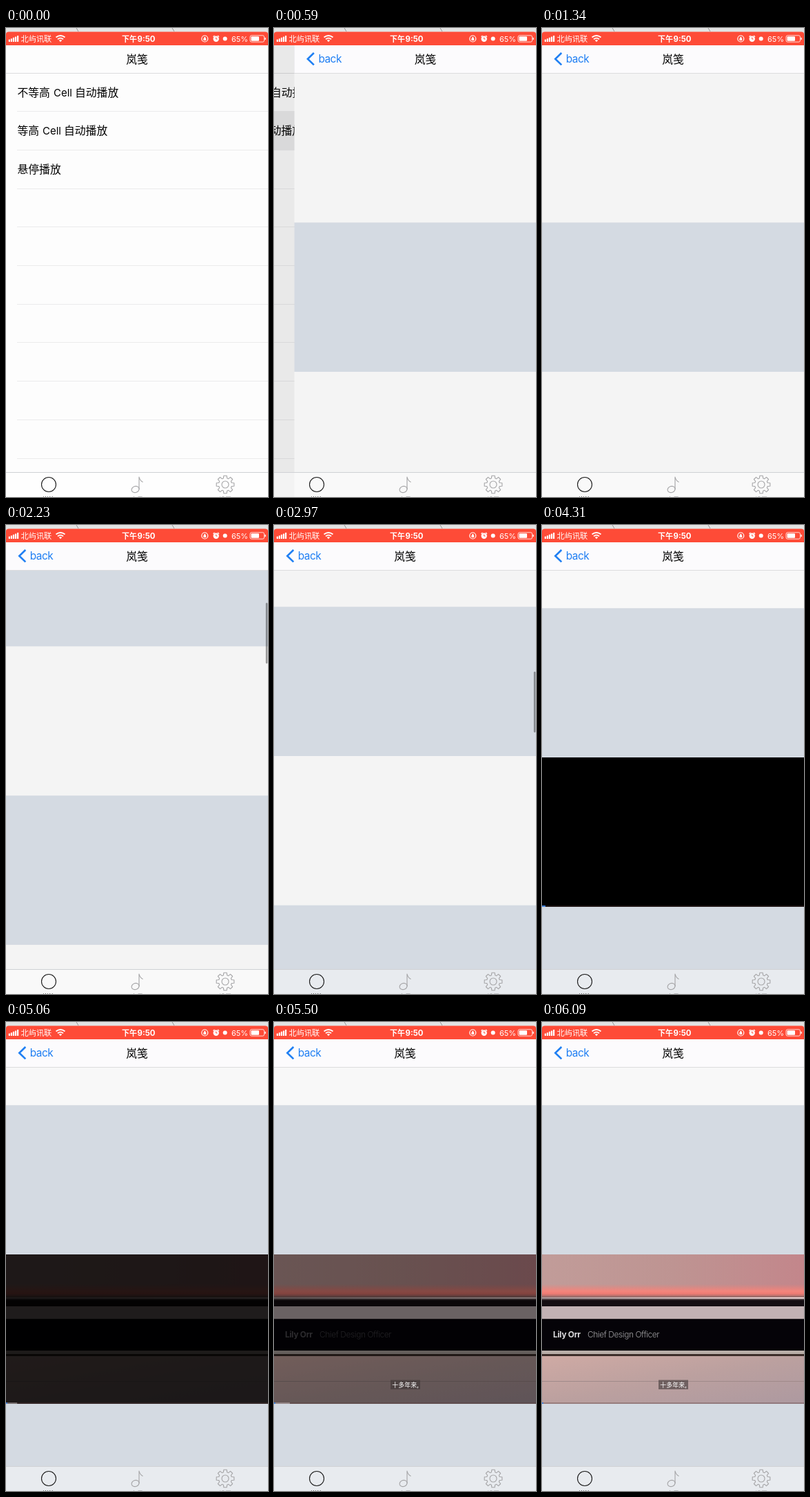
Animation, 380 px wide and 678 px high, one loop 6190 ms. Source, as an HTML page:

```html
<!DOCTYPE html>
<html lang="zh">
<head>
<meta charset="utf-8">
<title>自动播放</title>
<style>
  html, body { margin: 0; width: 100%; height: 100%; overflow: hidden; background: #fdfdfd; }
  svg { display: block; width: 380px; height: 678px; font-family: Inter, "Noto Sans CJK SC", "Noto Sans CJK", sans-serif; }
  text { white-space: pre; }
  .title { font-size: 15.8px; font-weight: 500; text-anchor: middle; }
  .row { font-size: 15.8px; }
  .latin { font-size: 15px; }
  .line { stroke: #ebebec; }
  .hair { stroke: #dcdcde; }
  .icon { fill: none; stroke: #a4a4a6; stroke-width: 1.1; stroke-linejoin: round; }
  .tab { font-size: 9px; text-anchor: middle; fill: #9c9c9e; }
  .status { fill: #fff; font-size: 11.2px; }
  .thin { fill: none; stroke: #fff; stroke-width: 1.2; }
</style>
</head>
<body>
<svg viewBox="0 0 380 678">
  <defs>
    <pattern id="cells" y="65.5" width="380" height="431.5" patternUnits="userSpaceOnUse">
      <rect id="pale" width="380" height="215.75" fill="#f4f4f4"/>
      <rect y="215.75" width="380" height="215.75" fill="#d4dae2"/>
    </pattern>
    <linearGradient id="metal">
      <stop offset="0" stop-color="#c19c99"/>
      <stop offset=".5" stop-color="#be9492"/>
      <stop offset="1" stop-color="#c3868b"/>
    </linearGradient>
    <linearGradient id="glow" x2="0" y2="1">
      <stop offset="0" stop-color="#f08078" stop-opacity="0"/>
      <stop offset=".6" stop-color="#f4857c"/>
      <stop offset=".8" stop-color="#ee7c74"/>
      <stop offset="1" stop-color="#b8706c"/>
    </linearGradient>
    <linearGradient id="base" x2="1" y2="1">
      <stop offset="0" stop-color="#cfaaa4"/>
      <stop offset=".5" stop-color="#bba09f"/>
      <stop offset="1" stop-color="#ad99a0"/>
    </linearGradient>
    <linearGradient id="edge">
      <stop offset="0" stop-color="#a89697"/>
      <stop offset=".6" stop-color="#d4bebe"/>
      <stop offset="1" stop-color="#ecd4d4"/>
    </linearGradient>
  </defs>

  <g id="list">
    <rect width="380" height="678" fill="#fdfdfd"/>
    <rect id="picked" y="121" width="380" height="56" fill="#ebebec"/>
    <g id="lines"></g>
    <text class="row" y="98.600"><tspan x="16.500">不等高</tspan><tspan x="69" class="latin">Cell</tspan><tspan x="100">自动播放</tspan></text>
    <text class="row" y="154.300"><tspan x="16.500">等高</tspan><tspan x="53" class="latin">Cell</tspan><tspan x="84">自动播放</tspan></text>
    <text class="row" x="16.500" y="210">悬停播放</text>
    <path class="hair" d="M0 65.5H380"/>
    <text class="title" x="190" y="50.7">岚笺</text>
  </g>
  <rect id="dim" width="380" height="678"/>

  <g id="page">
    <rect id="feed" y="-100" width="380" height="4400" fill="url(#cells)"/>
    <g id="player">
      <rect y="336" width="380" height="216"/>
      <g id="video">
        <rect y="336" width="380" height="60" fill="url(#metal)"/>
        <rect y="379" width="380" height="17" fill="url(#glow)"/>
        <rect y="396" width="380" height="2" fill="#9c6c6a"/>
        <rect y="398" width="380" height="2.500" fill="url(#edge)"/>
        <rect y="400.500" width="380" height="1.500" fill="#4a3c40"/>
        <rect y="402" width="380" height="9" fill="#140e12"/>
        <rect y="411" width="380" height="18.500" fill="#c2b2b4"/>
        <rect y="429.500" width="380" height="45.500" fill="#050308"/>
        <rect y="475" width="380" height="5" fill="#b9aea8"/>
        <rect y="480" width="380" height="3" fill="#3d2e2a"/>
        <rect y="483" width="380" height="69" fill="url(#base)"/>
        <path d="M0 519.5H380" stroke="#a08a8a"/>
      </g>
      <g id="caption" font-size="11.9" letter-spacing="-.3" fill="#dcdcde">
        <text x="16" y="456.2" font-weight="700">Lily Orr</text>
        <text x="66" y="456.2" fill="#a4a4a6" font-weight="300" letter-spacing="-.4">Chief Design Officer</text>
      </g>
      <g id="subtitle">
        <rect x="169" y="517.5" width="43" height="13.5" fill="#3c3434" opacity=".58"/>
        <text x="190.500" y="527.700" font-size="9" font-weight="500" fill="#fff" text-anchor="middle">十多年来,</text>
      </g>
      <rect y="550" width="380" height="2" fill="#5a3c3c" opacity=".35"/>
      <rect id="buffer" y="550" height="2" fill="#fff" opacity=".32"/>
      <rect id="played" y="550" height="2" fill="#3f7fd8"/>
    </g>
    <rect id="bar" x="376.8" width="2.600" height="88" rx="1.3" fill="#000"/>
    <rect width="380" height="65" fill="#fcfbfd"/>
    <path class="hair" d="M0 65.5H380"/>
    <path d="M28.300 36L19.300 44.700L28.300 53.400" fill="none" stroke="#1f7ff3" stroke-width="2.600"/>
    <text x="34.800" y="50" font-size="15.4" letter-spacing="-.5" fill="#1f7ff3">back</text>
    <text class="title" x="190" y="50.7">岚笺</text>
  </g>

  <rect y="642" width="380" height="36" fill="#fff" opacity=".45"/>
  <path d="M0 642.5H380" stroke="#cfd1d4"/>
  <circle class="icon" cx="62" cy="660" r="10.500" style="stroke:#1c1c1c"/>
  <path class="icon" d="M193 667V649Q194 654 198.500 656.500"/>
  <ellipse class="icon" cx="187.600" cy="667" rx="5.600" ry="4.500" transform="rotate(-20 187.600 667)"/>
  <path id="gear" class="icon"/>
  <circle class="icon" cx="318" cy="660" r="5"/>
  <text class="tab" x="62" y="684.500" style="fill:#1c1c1c">岚笺</text>
  <text class="tab" x="190" y="684.500">音乐</text>
  <text class="tab" x="318" y="684.500">设置</text>

  <rect width="380" height="9" fill="#e2e3e3"/>
  <path d="M102 0L105 5M241 0L244 5" stroke="#999"/>
  <path d="M0 25V9Q0 5.500 4 5.500H376Q380 5.500 380 9V25Z" fill="#fe4b37"/>
  <g class="status">
    <g id="signal"></g>
    <text x="21.500" y="19.700">北屿讯联</text>
    <path class="thin" d="M72.500 13.500Q79 8.500 85.500 13.500M75 16.200Q79 13 83 16.200" style="stroke-width:1.8"/>
    <path d="M76.800 17.800Q79 16.400 81.200 17.800L79 20.200Z"/>
    <text x="168" y="19.700" font-weight="600" font-size="11">下午</text>
    <text x="190.500" y="19.700" font-weight="700" font-size="11.4">9:50</text>
    <circle class="thin" cx="288.300" cy="15.500" r="4.500"/>
    <path d="M286.400 15H290.200V18H286.400ZM287 15V13.300H289.600V15"/>
    <circle cx="304.700" cy="15.800" r="4.200"/>
    <path class="thin" d="M300.500 12.700L302.500 11M307 11L309 12.700"/>
    <path d="M304.700 13.500V16H306.500" fill="none" stroke="#fe4b37"/>
    <circle cx="317.700" cy="15.600" r="3"/>
    <text x="327" y="19.700" font-size="11">65%</text>
    <rect x="354" y="10.800" width="20.500" height="9.400" rx="2.200" fill="none" stroke="#fff" stroke-opacity=".8"/>
    <rect x="355.500" y="12.200" width="11.500" height="6.600" rx="1"/>
    <rect x="375.400" y="13.700" width="1.400" height="3.600" rx=".7"/>
  </g>
</svg>
<script>
const LOOP = 6190;
const el = id => document.getElementById(id);
const set = (id, attrs) => {
  for (const name in attrs) el(id).setAttribute(name, attrs[name]);
};
const ramp = (t, from, to) => Math.min(1, Math.max(0, (t - from) / (to - from)));
const smooth = u => u * u * (3 - 2 * u);

// Static repeats
for (let i = 1; i <= 10; i++) {
  const y = Math.round(65 + 55.7 * i - .5) + .5;
  el("lines").innerHTML += `<path class="line" d="M16 ${y}H380"/>`;
}
for (let i = 0; i < 5; i++) {
  const h = 3.4 + 1.4 * i;
  el("signal").innerHTML += `<rect x="${3.8 + 3.05 * i}" y="${20 - h}" width="2.2" height="${h}" rx=".6"/>`;
}
const teeth = [];
for (let i = 0; i < 8; i++) {
  for (const [turn, r] of [[-.27, 9.6], [-.17, 13], [.17, 13], [.27, 9.6]]) {
    const a = i * Math.PI / 4 + turn;
    teeth.push((318 + r * Math.cos(a)).toFixed(2) + " " + (660 + r * Math.sin(a)).toFixed(2));
  }
}
set("gear", { d: "M" + teeth.join("L") + "Z" });

function stepTime(t) {
  const tick = Math.floor(t / 10) * 10 + 9.99;
  const k = Math.floor((tick - 302.5) / 148.63);
  return k < 0 ? 0 : Math.floor((302.5 + 148.63 * k) / 10) * 10;
}

// Critically damped push
function slide(t) {
  const w = Math.max(0, t - 270) * .01313;
  return 380 * (1 + w) * Math.exp(-w);
}

function draw(t) {
  const x = slide(t);
  const shown = 1 - x / 380;
  set("page", { transform: `translate(${x.toFixed(2)} 0)` });
  set("list", { transform: `translate(${(-114 * shown).toFixed(2)} 0)` });
  set("dim", { opacity: .085 * shown });
  set("picked", { opacity: t >= 300 ? 1 : 0 });

  const scroll = 1026 * smooth(ramp(t, 1790, 2970)) - 2 * ramp(t, 2970, 3260);
  set("feed", { transform: `translate(0 ${(-scroll).toFixed(2)})` });
  set("pale", { fill: t > 3850 ? "#f8f8f8" : "#f4f4f4" });
  set("bar", {
    y: 67 + scroll / 7.08,
    opacity: .38 * ramp(t, 1700, 1900) * (1 - ramp(t, 3450, 3750))
  });

  set("player", { opacity: t >= 4000 ? 1 : 0 });
  set("video", { opacity: ramp(t, 4870, 6020) });
  set("caption", { opacity: ramp(t, 5370, 6050) });
  set("subtitle", { opacity: t >= 5350 ? 1 : 0 });
  set("buffer", { width: Math.max(0, (t - 3980) * .0151), opacity: .32 * (1 - ramp(t, 5600, 6000)) });
  set("played", { width: t < 4900 ? 5 : 2 });
}

const start = performance.now();
function frame() {
  draw(stepTime((performance.now() - start) % LOOP));
  requestAnimationFrame(frame);
}
frame();
</script>
</body>
</html>
```
